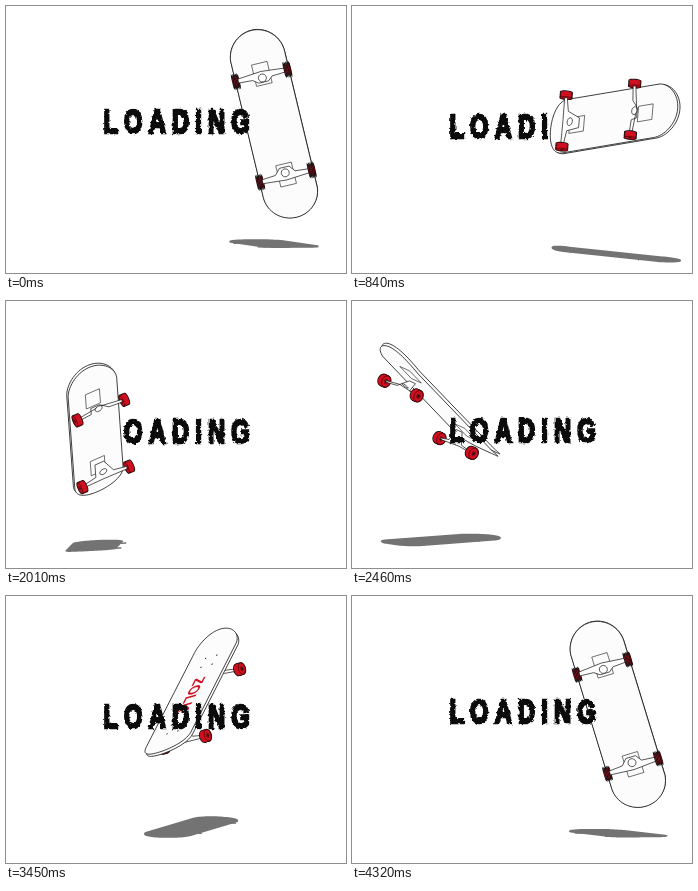
An HTML page with a canvas that plays this animation: 340 by 267 pixels, repeating every 4350 ms.

```html
<!DOCTYPE html>
<html lang="en">
<head>
<meta charset="utf-8">
<title>Loading</title>
<style>
html, body { margin: 0; width: 100%; height: 100%; overflow: hidden; }
html { background: #fff; }
canvas, svg { position: absolute; left: 0; top: 0; }
canvas { z-index: 1; }
text { font: bold 33px "Liberation Sans", Arial, sans-serif; letter-spacing: 8.5px; fill: #0c0c0c; stroke: #0c0c0c; stroke-width: 2.6px; }
</style>
</head>
<body>
<canvas id="stage" width="340" height="267"></canvas>
<svg id="label" width="340" height="267">
  <filter id="rough" x="-5%" y="-20%" width="110%" height="140%" color-interpolation-filters="sRGB">
    <feTurbulence id="grain" type="fractalNoise" baseFrequency=".35" numOctaves="2"/>
    <feDisplacementMap in="SourceGraphic" scale="3.5" xChannelSelector="R" yChannelSelector="G"/>
  </filter>
  <g filter="url(#rough)"><text transform="translate(97.4 134.5) scale(.72 1)">LOADING</text></g>
</svg>
<script>
const LOOP = 4350, STEP = 30;
const RED = '#cf1020', INK = '#111', DECK = '#fcfcfc', SHADE = '#737373';
const ctx = document.getElementById('stage').getContext('2d');
const label = document.getElementById('label');
const grain = document.getElementById('grain');

const { sin, cos, sign, abs, PI } = Math;
const rad = deg => deg * PI / 180;
const cross = (a, b) => [a[1] * b[2] - a[2] * b[1], a[2] * b[0] - a[0] * b[2], a[0] * b[1] - a[1] * b[0]];

// The board circles the word while it turns, tips and rolls twice: slow waves of one lap
function poseAt(lap) {
  const wave = (times, size, lag) => size * cos(rad(times * lap - lag));
  const turn = rad(lap - 109 + wave(1, 68, 96) + wave(2, 28, -90) + wave(3, 13, 15));
  const tip = rad(5 + wave(1, 37, -2) + wave(2, 27, 175) - wave(3, 10, 10));
  const roll = rad(25 - 2 * lap + wave(1, 85, 75) + wave(2, 35, 150) + wave(3, 15, 190));

  // u along the board, w across it, n out of its top (x right, y down, z to the viewer)
  const u = [cos(turn) * cos(tip), sin(turn) * cos(tip), sin(tip)];
  const flat = [-sin(turn), cos(turn), 0];
  const steep = cross(u, flat);
  const w = flat.map((v, i) => v * cos(roll) + steep[i] * sin(roll));
  return {
    x: 185.5 + wave(1, 98, 18) + wave(2, 14, 140),
    y: 114.5 + wave(1, 18, 103) + wave(2, 16, 283) + wave(3, 4, 0),
    floor: 240.5 + wave(1, 9.5, 105),
    u, w, n: cross(w, u)
  };
}

function shape(pts, fill, stroke, width = .8) {
  ctx.beginPath();
  pts.forEach(p => ctx.lineTo(p[0], p[1]));
  ctx.closePath();
  if (fill) { ctx.fillStyle = fill; ctx.fill(); }
  if (stroke) { ctx.strokeStyle = stroke; ctx.lineWidth = width; ctx.stroke(); }
}

const ring = (n, f) => Array.from({ length: n }, (_, i) => f(cos(i / n * 2 * PI), sin(i / n * 2 * PI)));

// Board points: a along, b across, c up from the deck
const outline = c => ring(64, (x, y) => {
  const a = 27.5 * x + (x < 0 ? -69 : 69);
  return [a, 27.5 * y, c + 5 * (Math.max(0, abs(a) - 62) / 34) ** 2];
});
const disc = (a, b, c, r) => ring(20, (x, y) => [a + r * x, b, c + r * y]);

function drawBoard({ x, y, floor, u, w, n }) {
  const at = ([a, b, c]) => u.map((v, i) => a * v + b * w[i] + c * n[i]);
  const view = pts => pts.map(at).map(v => [x + v[0], y + v[1]]);
  const ground = pts => pts.map(at).map(v => [x + v[0], floor + .1 * v[2] + .045 * v[1]]);
  const up = n[2] > 0;

  function wheel(a, side) {
    const near = sign(w[2]) || 1;
    const slices = [-2.8, -1.4, 0, 1.4, 2.8].map(d => view(disc(a, side * 26.5 + d * near, -19, 5.8)));
    slices.forEach(s => shape(s, null, INK, 1.6));
    slices.forEach(s => shape(s, RED));
    shape(slices[4], RED, '#400', .7);
    if (abs(w[2]) < .2) return;
    const hub = r => view(disc(a, side * 26.5 + 2.8 * near, -19, r));
    shape(hub(2.8), '#8c0c16');
    shape(hub(1.4), INK);
  }

  function truck(end) {
    const a = end * 52, inward = (d, b, c) => [a - end * d, b, c];
    const plate = ring(4, (p, q) => inward(11 * (p - q), 8 * (p + q), -2));
    const half = [[2, 24, -19], [3, 10, -17], [8, 5, -6]];
    const hanger = [
      ...half.map(([d, b, c]) => inward(d, b, c)),
      ...half.reverse().map(([d, b, c]) => inward(d, -b, c)),
      inward(-2, -24, -19), inward(-4, 0, -17), inward(-2, 24, -19)
    ];
    const far = w[2] > 0 ? -1 : 1;
    shape(view(plate), DECK, INK, .6);
    wheel(a, far);
    shape(view(hanger), '#fff', INK, .7);
    shape(view(ring(16, (p, q) => inward(3 + 4 * p, 4 * q, -14))), '#fff', INK, .7);
    wheel(a, -far);
  }

  function trucks() {
    const far = u[2] > 0 ? -1 : 1;
    truck(far);
    truck(-far);
  }

  function deck() {
    const faces = up ? [-3, 0] : [0, -3];
    faces.forEach(c => shape(view(outline(c)), DECK, INK));
    if (!up) return;
    for (const a of [-59, -45, 45, 59])
      for (const b of [-7, 7]) shape(view(ring(8, (p, q) => [a + p, b + q, 0])), INK);
    ctx.save();
    ctx.transform(u[0], u[1], -w[0], -w[1], x, y);
    ctx.font = 'bold 20px "Liberation Sans", Arial, sans-serif';
    ctx.textAlign = 'center';
    ctx.fillStyle = RED;
    ctx.fillText('ZOLK', 0, 7);
    ctx.restore();
  }

  shape(ground(outline(0)), SHADE, SHADE, 2);
  for (const a of [-52, 52]) shape(ground([[a, -29, -8], [a, 29, -8]]), null, SHADE, 1);
  if (up) { trucks(); deck(); } else { deck(); trucks(); }
}

function frame() {
  const step = Math.floor(performance.now() % LOOP / STEP);
  const lap = step * STEP / LOOP * 360;
  ctx.clearRect(0, 0, 340, 267);
  drawBoard(poseAt(lap));

  // The word bobs once a lap; the board is in front of it for the nearer half
  label.style.transform = `translateY(${-7.5 * cos(rad(lap))}px)`;
  label.style.zIndex = cos(rad(lap - 110)) > 0 ? 0 : 2;
  grain.setAttribute('seed', 1 + step % 5);
  requestAnimationFrame(frame);
}
frame();
</script>
</body>
</html>
```
